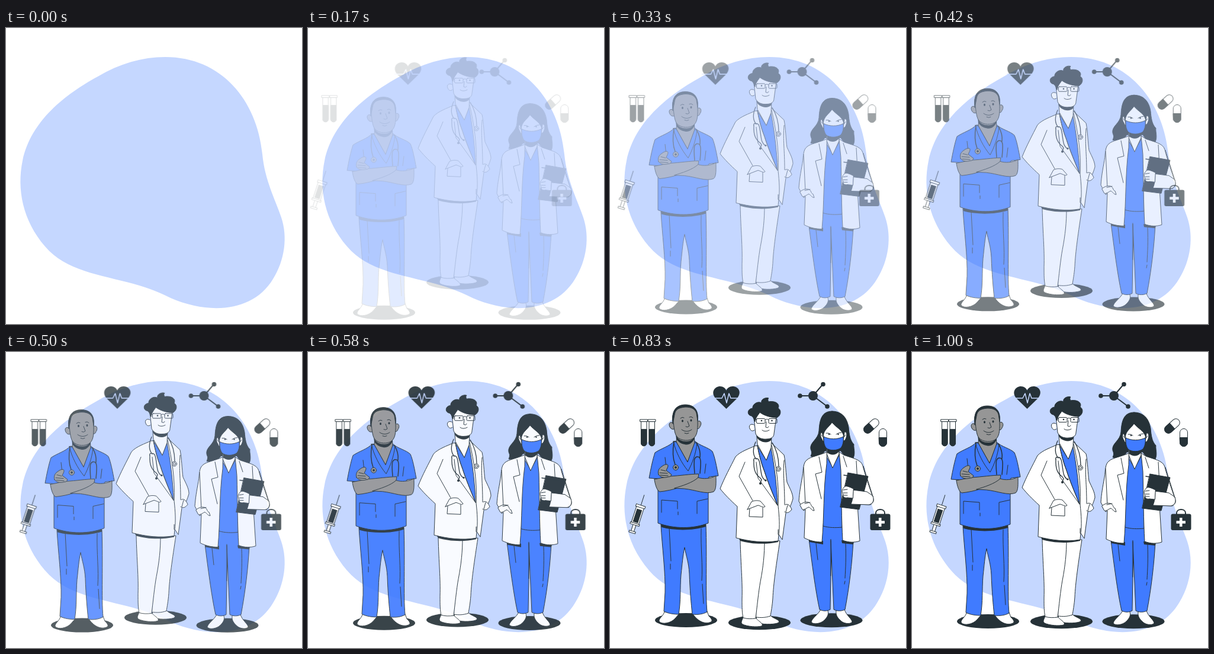
Animation, 500 px wide and 500 px high, one loop 1.04 s. Source, as an HTML page:

```html
<!DOCTYPE html>
<html lang="en">
<head>
<meta charset="utf-8">
<title>Medical team</title>
<style>
html, body { margin: 0; width: 100%; height: 100%; overflow: hidden; background: #fff; }
svg { display: block; width: 100%; height: 100%; --p: 0; --gap: calc((1 - var(--p)) * 30px); }
.rise, .drop, .slide {
  opacity: var(--p); fill: none; stroke: #263238; stroke-width: 1;
  stroke-linecap: round; stroke-linejoin: round;
}
.rise { transform: translateY(var(--gap)); }
.drop { transform: translateY(calc(-1 * var(--gap))); }
.slide { transform: translateX(calc(-1 * var(--gap))); }
.w { fill: #fff; }
.b { fill: #407bff; }
.s { fill: #969696; }
.d { fill: #263238; }
.flat { stroke: none; }
</style>
</head>
<body>
<svg id="stage" viewBox="0 0 500 500">
  <path fill="#c5d7ff" d="M155 82C192 60 230 49 269 49C364 49 424 122 433 213C437 257 455 290 465 320C476 353 471 392 451 424C418 479 345 485 278 456C262 448 244 440 215 432C160 417 100 410 66 369C28 325 18 272 28 224C42 157 100 112 155 82Z"/>

  <!-- doctor -->
  <g class="drop">
    <ellipse class="d flat" cx="252.500" cy="455.200" rx="52.500" ry="12"/>
    <path class="w" d="M247 444C248 450 246 455 252 456C262 459 280 458 285 455C288 450 276 449 271 443Z"/>
    <path class="w" d="M225 446C223 452 220 455 224 458C233 462 248 463 256 461C261 457 249 452 246 447Z"/>
    <path class="w" d="M247 318L287 317C281 356 276 390 275 414C274 428 272 437 271 444C262 447 255 447 247 446Z"/>
    <path class="w" d="M220 316C221 360 224 385 223 415C223 430 223 439 225 447C231 449 239 449 246 448C248 432 251 402 254 386C259 360 261 340 261 317Z"/>
    <path class="d flat" d="M217 312C236 318 262 320 284 315L284 319C262 324 236 322 220 317Z"/>
    <path class="w" d="M274 153L294 172C297 186 297 205 299 218C304 229 309 237 309 246C306 256 303 264 297 270L291 315L285 306L284 317C260 321 236 318 213 312L215 259C203 248 194 239 186 229C193 211 204 191 212 175C220 166 236 161 244 157Z"/>
    <path class="b" d="M249 157L264 181L272 160C277 186 282 222 283 257C274 235 266 216 261 200C255 185 252 172 249 157Z"/>
    <path class="w" d="M248 141L249 154L264 181L272 160L273 140Z"/>
    <path d="M249 156C252 172 255 185 261 200C266 216 274 235 283 257M247 184L250 211L283 257"/>
    <path d="M273 155C280 187 286 221 284 258C286 276 287 292 285 306M284 298V306"/>
    <path d="M228 184L218 208L241 249M294 181C292 207 295 222 295 256"/>
    <path d="M236 263L235 276L258 277L258 261"/>
    <path class="w" d="M232 264L239 251C245 248 251 249 254 250L262 259C259 262 255 258 250 257C244 259 238 262 232 264Z"/>
    <path class="w" d="M296 256C301 253 305 259 307 264C303 269 300 271 295 268M300 257L297 268"/>
    <path class="w" d="M243 121C237 118 234 123 236 127C238 132 241 132 244 130"/>
    <path class="d flat" d="M247 138C248 150 266 154 272 147L275 139Z"/>
    <path class="w" d="M243 108L246 136C249 143 257 146 265 145C273 145 277 141 277 136L281 107L256 96Z"/>
    <path class="d" d="M239 106C231 105 231 94 241 93C240 87 249 80 256 84C254 78 263 74 268 76C266 78 267 80 268 82C278 80 288 85 284 93C290 96 289 105 282 109C273 109 261 106 253 100C251 104 246 108 245 116L242 109Z"/>
    <path d="M262 113C264 111 266 111 268 113M243 113L247 112"/>
    <rect x="247.500" y="110.500" width="14.500" height="8" rx="1.500"/>
    <rect x="268" y="110.500" width="14" height="8" rx="1.500"/>
    <path d="M264 116L263 125Q267 127 268 124M257 130C260 133 266 132 269 130"/>
    <circle class="d flat" cx="256" cy="114" r="1.300"/><circle class="d flat" cx="273.500" cy="114" r="1.300"/>
    <path d="M246 150C240 164 242 173 247 179M243 181C242 199 247 206 254 211M248 178C253 179 253 187 255 200C256 207 257 211 262 215M254 211L256 214L254 219M247 178C243 177 242 179 243 183" stroke-width="1.300"/>
    <path d="M274 151C282 164 285 177 285 191" stroke-width="1.300"/>
    <circle class="d flat" cx="254" cy="220" r="2"/><circle class="d flat" cx="263" cy="215" r="1.600"/>
    <circle class="w" cx="284.500" cy="195.500" r="4"/><circle cx="284.500" cy="195.500" r="2"/>
  </g>

  <!-- nurse -->
  <g class="rise">
    <ellipse class="d flat" cx="128.500" cy="455" rx="52.500" ry="12"/>
    <path class="w" d="M92 441C90 448 82 452 83 457C88 463 103 460 110 452L117 444Z"/>
    <path class="w" d="M139 443C145 453 156 462 168 459C175 457 172 453 167 448L164 440Z"/>
    <path class="b" d="M86 294C88 330 94 375 93 408L91 440C99 444 108 445 116 445C120 421 118 402 120 378C122 360 123 346 126 332C129 348 133 358 134 376C135 404 137 427 139 445C148 446 157 445 164 441C161 410 164 352 162 294Z"/>
    <path d="M100 299L103 355M102 360V369M154 300C153 335 157 361 155 388M156 394L158 427"/>
    <path class="d flat" d="M85 290C107 298 140 299 162 290V297C140 304 109 304 87 298Z"/>
    <path class="b" d="M108 153C101 161 86 165 76 172C72 184 69 199 66 215L81 216L81 291C108 301 141 301 166 291V240L167 213L183 211C180 195 177 179 173 170C166 163 151 160 144 153Z"/>
    <path d="M93 180L95 198M162 191L160 207"/>
    <path class="s" d="M113 140L112 154L131 188L143 156L142 138Z"/>
    <path class="b" d="M107 153L112 154L131 188L143 155L147 156C145 174 139 190 132 203C121 190 111 171 107 153Z"/>
    <path class="d flat" d="M111 141C114 150 121 153 129 153C137 153 142 149 143 141L143 148C139 156 133 160 126 158C119 157 115 153 112 149Z"/>
    <path class="s" d="M107 122C100 118 98 125 102 130C104 133 108 133 110 131M147 120C153 115 156 123 152 128C151 132 147 133 145 130"/>
    <path class="s" d="M106 112C107 95 116 92 128 92C141 92 149 100 148 115C148 129 149 140 142 147C135 153 120 153 113 145C108 139 108 125 106 112Z"/>
    <path class="d" d="M106 123C103 102 112 91 127 91C143 91 150 101 148 118L146 105C143 97 136 95 127 95C116 96 110 99 109 108Z"/>
    <path d="M119 114Q122 111 125 113M134 112Q137 110 140 113M131 119L134 127Q131 130 128 128M121 133C126 137 133 137 138 133M126 139Q130 141 133 139"/>
    <ellipse class="d flat" cx="122.500" cy="118.500" rx="1.500" ry="2"/><ellipse class="d flat" cx="137" cy="117.500" rx="1.500" ry="2"/>
    <path d="M108 154C105 171 107 184 110 192M146 155C152 165 153 172 152 180M143 207C141 184 142 179 148 179C154 179 154 187 152 207" stroke-width="1.500"/>
    <circle class="s" cx="111" cy="197" r="4.500"/><circle class="d flat" cx="111" cy="197" r="2"/>
    <path class="s" d="M75 217L100 212C118 211 136 208 150 208L148 219C129 228 105 236 84 238C79 236 76 225 75 217Z"/>
    <path class="s" d="M109 232C122 228 139 223 149 214C157 217 170 216 179 211C179 222 180 234 175 238C162 243 145 235 126 233Z"/>
    <path class="s" d="M82 209C80 203 83 198 88 195C93 191 98 191 98 194C98 197 96 199 95 202L104 209C103 212 101 213 98 213C92 215 85 214 82 209ZM84 206L97 207M85 210L98 211M86 201L94 203"/>
    <path d="M87 273V252L114 254V267M115 272V277M147 275V254L165 250"/>
  </g>

  <!-- masked doctor -->
  <g class="rise">
    <ellipse class="d flat" cx="374" cy="455.200" rx="52.500" ry="12"/>
    <path class="w" d="M356 437C352 445 341 452 340 458C343 463 356 461 362 455C367 450 370 445 368 439Z"/>
    <path class="w" d="M382 439C381 446 384 451 391 457C396 461 406 462 409 458C409 453 399 447 396 437Z"/>
    <path class="b" d="M358 290H374V320L372 437C366 440 360 440 354 437C347 405 341 357 336 318Z"/>
    <path class="b" d="M373 290H393L411 320C409 359 404 400 397 437C391 440 384 440 378 437L373 320Z"/>
    <path class="b flat" d="M360 290H392V318H360Z"/>
    <path d="M373 320V380M348 325L351 353M398 325C399 350 398 366 397 384M397 389L396 394"/>
    <path class="d flat" d="M335 317L360 321V327L337 323ZM391 320L412 322L411 327L392 325Z"/>
    <path class="d" d="M375 102C358 102 354 116 353 135C352 150 337 154 339 166C340 170 342 171 339 178C350 180 359 176 363 169H390C394 177 402 182 411 181C415 172 411 164 412 158C405 151 404 140 403 129C400 111 390 102 375 102Z"/>
    <path class="b" d="M362 173L376 196L389 173C392 215 391 255 392 298C381 299 370 299 360 296Z"/>
    <path class="w" d="M366 162V174L376 198L387 174V162Z"/>
    <path class="d flat" d="M366 163L387 163V170C381 177 373 177 367 172Z"/>
    <path class="w" d="M366 171C353 177 338 179 333 184C326 189 327 199 325 212C322 229 320 239 319 254C322 260 325 264 327 270L330 268L328 316C338 321 348 323 358 323C362 280 360 235 366 191Z"/>
    <path class="w" d="M387 171L390 202C391 245 391 285 393 320C403 324 414 324 422 321L418 259L440 260C444 257 446 254 445 250C438 230 431 210 427 194C424 183 408 181 395 176Z"/>
    <path d="M353 179L358 205L347 208L357 250M394 178L400 196M416 186L418 222M327 197L330 259"/>
    <path class="w" d="M321 260C327 255 332 255 336 256C341 259 339 263 343 264L345 270C340 270 339 264 335 264C331 267 326 269 325 268Z"/>
    <path d="M329 258L338 256"/>
    <path class="d" d="M402 206L436 212L421 268L389 264Z"/>
    <path d="M395 210L433 216" stroke-width="1.500"/>
    <path class="w" d="M410 235L434 238L444 245C447 254 443 259 437 260L407 259C410 252 411 244 410 235Z"/>
    <path class="w" d="M411 233C405 230 397 226 395 231C391 234 392 240 394 243C393 247 397 249 401 248L410 249Z"/>
    <path d="M394 235L401 234M394 240L401 240M395 244L401 244M428 195L444 246"/>
    <path class="w" d="M361 139C355 135 354 143 358 149C359 153 362 154 364 151M394 138C401 134 401 143 398 149C396 153 394 152 392 150"/>
    <path class="w" d="M375 120C367 130 361 133 360 141C360 157 364 166 377 167C390 166 395 157 395 141C395 133 385 129 375 120Z"/>
    <path class="d" d="M375 121C369 130 362 132 360 144C355 133 359 113 375 111C391 113 399 128 395 145C393 133 382 130 375 121Z"/>
    <path class="b" d="M361 145C371 150 384 150 394 145C395 153 393 160 390 164C383 169 371 169 365 164C361 158 361 152 361 145Z"/>
    <path d="M365 139Q369 138 373 141M382 141Q386 138 391 138M361 147L357 142M394 147L398 142"/>
    <circle class="d flat" cx="370" cy="141" r="1.200"/><circle class="d flat" cx="385.500" cy="141" r="1.200"/>
  </g>

  <!-- floating icons -->
  <g class="slide">
    <g id="tube">
      <path class="w" d="M50.500 118V154A4.750 4.750 0 0 0 60 154V118Z"/>
      <path class="d" d="M50.500 131V154A4.750 4.750 0 0 0 60 154V131Z"/>
      <rect class="w" x="49" y="114" width="12.500" height="3.500"/>
    </g>
    <use href="#tube" x="13.500"/>
    <path class="d flat" d="M194.500 96L177 79C167 68 175 58 184 58C189 58 193 61 194.500 65C196 61 200 58 205 58C215 58 222 68 212 79Z"/>
    <path stroke="#c5d7ff" stroke-width="1.500" d="M172 78H187L191 70L195 86L199 70L202 78H217"/>
    <path stroke-width="2" d="M358 54L341 74H319M341 74L365 92"/>
    <g class="d flat">
      <circle cx="341" cy="74" r="8"/><circle cx="358" cy="54.500" r="3.800"/>
      <circle cx="319" cy="74" r="3.800"/><circle cx="365" cy="92" r="3.800"/>
    </g>
    <g id="pill" transform="translate(459 144.500)">
      <rect class="w" x="-6.500" y="-15" width="13" height="30" rx="6.500"/>
      <path class="d" d="M-6.500 0H6.500V8.500A6.500 6.500 0 0 1 -6.500 8.500Z"/>
    </g>
    <use href="#pill" transform="translate(439.500 125) rotate(48) translate(-459 -144.500)"/>
    <path d="M447 275V272C447 264 462 264 462 272V275" stroke-width="2"/>
    <rect class="d flat" x="437.500" y="273.500" width="34" height="27.500" rx="3"/>
    <path d="M446.500 287.500H462M454.250 280V295" stroke="#fff" stroke-width="4.500" stroke-linecap="butt"/>
    <g transform="translate(45 275) rotate(18)">
      <path d="M0 -35V-17"/>
      <path class="w" d="M-2.500 16H2.500V30H-2.500Z"/>
      <rect class="w" x="-5.500" y="29" width="11" height="3"/>
      <rect class="w" x="-6.500" y="-14" width="13" height="30"/>
      <rect class="d" x="-4" y="-9" width="8" height="22"/>
      <path class="w" d="M-8 -17H8V-13H-8ZM-8 15H8V18H-8Z"/>
    </g>
  </g>
</svg>
<script>
const LOOP = 1040, STEPS = 25, STEP = 1000 / 24;
const stage = document.getElementById('stage');
const bez = (a, b, s) => 3 * (1 - s) ** 2 * s * a + 3 * (1 - s) * s * s * b + s ** 3;

// cubic-bezier(.36, -.01, .5, 1.38): the pose overshoots, then settles
function ease(x) {
  let lo = 0, hi = 1;
  for (let i = 0; i < 30; i++) {
    const mid = (lo + hi) / 2;
    if (bez(.36, .5, mid) < x) lo = mid; else hi = mid;
  }
  return bez(-.01, 1.38, hi);
}

// The motion runs at 24 steps a second, after a short blank start
function draw() {
  const t = performance.now() % LOOP;
  const k = Math.min(STEPS - 1, Math.floor((t + 6) / STEP));
  stage.style.setProperty('--p', k < 2 ? 0 : ease((k + 1) / STEPS).toFixed(4));
  requestAnimationFrame(draw);
}
draw();
</script>
</body>
</html>
```
